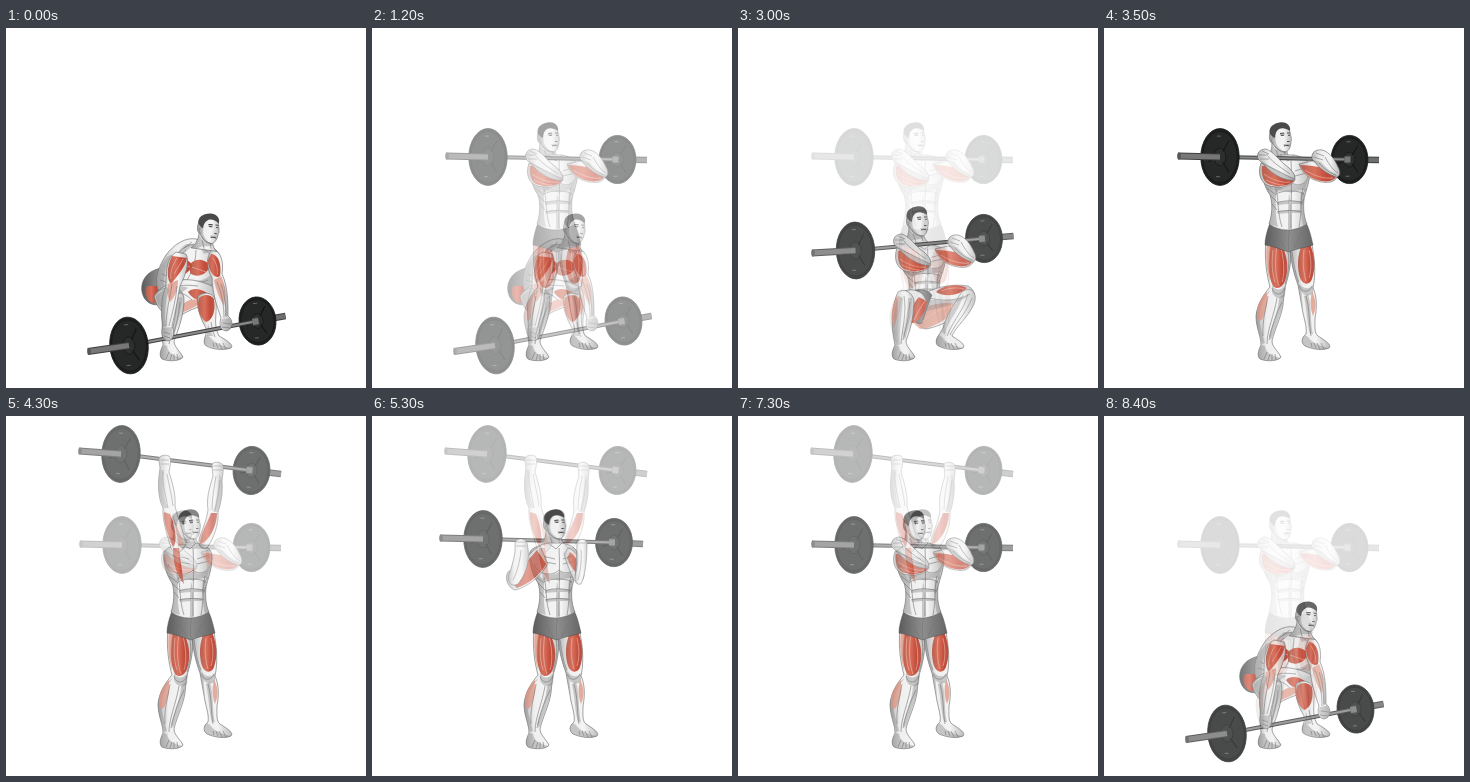
An HTML page that plays this animation: 360x360 px, repeating every 8500 ms.

```html
<!DOCTYPE html>
<html lang="en">
<head>
<meta charset="utf-8">
<style>
html, body { margin: 0; width: 100%; height: 100%; overflow: hidden; background: #fff }
svg { display: block; width: 100vw; height: 100vh }
.skin { fill: url(#skin); stroke: #666; stroke-width: .6 }
.red { fill: url(#red) }
.pale { fill: #dd9482; opacity: .75 }
.shade { fill: #7d7d7d; opacity: .38 }
.line { fill: none; stroke: #757575; stroke-width: .6 }
.fiber { fill: none; stroke: #efc0b2; stroke-width: .6 }
.dark { fill: none; stroke: #3c3c3c; stroke-width: .9 }
.hair { fill: #4a4a4a }
.shorts { fill: url(#shorts); stroke: #4a4a4a; stroke-width: .5 }
</style>
</head>
<body>
<svg viewBox="0 0 360 360">
  <defs>
    <linearGradient id="skin">
      <stop offset="0" stop-color="#b4b4b4"/><stop offset=".3" stop-color="#efefef"/>
      <stop offset=".65" stop-color="#f4f4f4"/><stop offset="1" stop-color="#bdbdbd"/>
    </linearGradient>
    <linearGradient id="red">
      <stop offset="0" stop-color="#b9604f"/><stop offset=".4" stop-color="#d8705c"/>
      <stop offset=".75" stop-color="#c24a38"/><stop offset="1" stop-color="#b9584a"/>
    </linearGradient>
    <linearGradient id="shorts">
      <stop offset="0" stop-color="#5c5c5c"/><stop offset=".5" stop-color="#8e8e8e"/><stop offset="1" stop-color="#666"/>
    </linearGradient>
  </defs>
</svg>
<script>
const svg = document.querySelector('svg');
const path = (cls, ...ds) => ds.map(d => `<path class="${cls}" d="${d}"/>`).join('');
const move = (x, y, body, extra = '') => `<g transform="translate(${x} ${y}) ${extra}">${body}</g>`;
const rod = (a, b, w, color) =>
  `<path d="M${a}L${b}" stroke="#3f3f3f" stroke-width="${w}"/><path d="M${a}L${b}" stroke="${color}" stroke-width="${w - 2}"/>`;

function plate([x, y], rx, ry, tilt) {
  const ring = (k, fill, stroke) => `<ellipse rx="${rx * k}" ry="${ry * k}" fill="${fill}" stroke="${stroke}" stroke-width=".8"/>`;
  const spoke = (u, v) => `M${rx * u * .25} ${ry * v * .25}L${rx * u * .75} ${ry * v * .75}`;
  return move(x, y, ring(.98, '#1e1f1f', '#161717') + ring(.88, '#262828', '#191a1a') + ring(.3, '#2d2f2f', '#171818') +
    `<path d="${spoke(.6, .7)}${spoke(.6, -.75)}${spoke(-.8, .2)}" stroke="#111" stroke-width="1"/>` +
    `<path d="M-3 ${-ry * .72}h4M-4 ${ry * .68}h4" stroke="#666" stroke-width="1"/>`, `rotate(${tilt})`);
}

// Barbell: left tip, left plate, right plate, right tip
const bar = (tipL, l, r, tipR, tilt) =>
  rod(r, tipR, 6.4, '#6f6f6f') + plate(r, 18.8, 24.6, tilt) + rod(l, r, 4.2, '#8b8b8b') +
  rod([r[0] - 5, r[1] - (r[1] - l[1]) * .04], [r[0] + 1, r[1]], 8, '#777') +
  plate(l, 19.6, 29, tilt) + rod(tipL, l, 7, '#777') +
  `<ellipse cx="${tipL[0] + 1}" cy="${tipL[1]}" rx="1.8" ry="3.6" fill="#555"/>`;

const head = (x, y, turn = 0) => move(x, y,
  path('skin', 'M-8 4C-8 12-9 17-14 22L12 22C8 19 7 16 6 12Z',
    'M-10-4C-10-13 8-16 10-5C11 0 12 2 11 4C11 9 9 14 6 15C1 16-4 12-7 7C-11 5-11 0-10-4Z') +
  path('shade', 'M-10-5C-9-9-6-10-2-9C-5-5-5 1-4 6C-2 11 2 14 6 15C1 16-4 12-7 7C-11 4-11 0-10-5Z',
    'M-8 8C-4 13 1 16 6 15L7 17C2 19-3 17-8 22H-13C-9 17-8 13-8 8Z', 'M0-4L5-4L4-1L0-1Z', 'M3 7L10 7L9 9L4 9Z') +
  path('hair', 'M-10-3C-12-9-7-14 1-14.7C8-15 11-10 10-6C6-9 2-9.5-1-8C-4-6-5-3-5 1L-7 0Z') +
  path('line', 'M-7 1C-10 1-8 7-6 6M-5 9C-3 13 2 15 6 15M-4 13L-1 21M4 14L6 20') +
  path('dark', 'M0-3.5L4-4M7-4L10-4M1-1.7H4M8-1.7H10M7 4.5H9.5M4 9C6 8.3 8 8.3 9.5 9'), `rotate(${turn})`);

const torso =
  path('skin', 'M158 136C160 131 170 129 176 127L190 127C200 129 207 133 206 143C206 153 202 162 200 171C199 181 200 190 203 196C190 204 176 204 165 196C168 187 169 176 166 167C161 160 156 146 158 136Z') +
  path('shade', 'M158 138C162 152 166 160 172 164C172 176 171 188 174 199L165 196C168 187 169 176 166 167C161 160 156 146 158 136Z',
    'M170 156C178 161 185 158 188 155C193 160 200 157 204 151L201 162C194 162 190 163 187 165C181 162 175 163 171 165Z',
    'M185 165C188 176 187 190 188 201L184 201C184 188 184 176 185 165Z', 'M197 164C195 176 197 188 199 198L203 196C200 188 198 178 201 166Z',
    'M173 174L185 173L185 176L173 177Z', 'M174 183L185 182L185 185L174 186Z', 'M188 173L197 173L197 176L188 176Z', 'M188 182L196 182L196 185L188 185Z') +
  path('line', 'M187 132C188 150 187 176 187 200M162 148C166 159 180 161 187 154C194 160 203 156 205 146M172 166C178 162 195 162 200 166M173 175C180 172 192 172 199 175M173 184C180 182 192 182 198 184M172 161C175 172 173 184 178 199M199 160C196 174 198 184 195 199',
    'M163 160L172 167M166 167L173 174M168 176L173 182M202 161L198 167M200 171L197 177M166 139L183 143M168 145L184 148M191 143L203 139M191 148L203 145M176 127L184 133L190 127');

const footL = 'C154 323 153 328 156 331C163 334 175 333 177 329C174 323 168 319 168 313';
const footR = 'C197 310 197 315 201 318C208 321 218 323 225 320C228 317 222 313 214 308';
const feet =
  path('shade', 'M158 317C154 323 153 328 156 331C163 334 172 333 177 330C170 329 162 326 161 318Z',
    'M201 307C197 310 197 315 201 318C208 321 218 323 225 320C216 318 208 315 204 309Z') +
  path('line', 'M160 331L163 324M164 332L166 326M168 332L168 326M172 332L171 326M208 319L207 315M212 320L210 315M216 321L213 315M220 321L217 315');

const legs =
  path('skin', `M162 212C160 232 163 248 166 259C160 266 153 276 152 288C152 300 157 308 157 317${footL}C170 303 177 290 179 277C180 268 180 262 182 256C186 243 188 230 186 216Z`,
    `M186 216C186 232 190 246 194 257C196 266 197 276 199 285C201 294 203 300 202 306${footR}C210 305 211 298 211 290C213 280 213 268 209 260C212 246 211 230 207 212Z`) +
  path('shade', 'M167 262C158 272 154 284 156 296L161 315L158 316C157 308 152 300 152 288C153 276 160 266 167 262Z',
    'M180 266C179 282 172 298 167 312L165 308C168 296 174 284 175 270Z', 'M168 257C171 263 178 263 182 257L181 268C176 272 170 270 168 264Z',
    'M188 222C188 236 192 248 197 259L199 282C197 270 195 262 194 257C190 246 186 232 187 220Z',
    'M204 266C208 280 206 296 209 306L206 306C203 296 203 282 200 268Z', 'M196 256C200 262 206 261 209 257L209 266C204 269 199 267 197 263Z') +
  path('red', 'M167 213C163 232 164 248 169 258C173 262 178 260 181 253C185 240 184 228 176 214Z',
    'M197 219C192 232 194 246 197 252C200 257 206 257 208 251C212 240 211 228 206 216Z') +
  path('pale', 'M163 264C154 272 151 283 154 292C159 296 161 284 163 276Z', 'M208 264C213 272 212 281 209 288C206 280 206 272 208 264Z',
    'M163 214C161 230 163 244 166 254C165 240 165 226 168 213Z') +
  path('fiber', 'M173 218C170 236 172 250 175 258M177 220C181 236 180 248 178 254M169 222C167 238 169 248 171 254M200 222C198 236 200 246 202 253M205 222C208 234 207 244 205 250') +
  path('line', 'M168 260C170 268 178 268 181 260M173 270C170 288 163 302 163 316M178 274C172 286 168 298 165 312M164 268C162 282 158 292 159 308M195 258C198 265 205 265 208 258M202 268C206 282 205 298 207 308M188 224C190 236 191 246 195 254M184 224C186 234 184 246 181 256') +
  feet + path('shorts', 'M166 195C163 203 161 210 161 217C169 218 178 222 185 224C193 220 202 220 209 217C207 208 205 200 202 195C190 201 178 201 166 195Z') +
  path('line', 'M186 200C184 208 184 216 185 224M166 200C172 206 178 214 181 221M202 199C198 206 193 212 190 220');

const rackArms =
  path('skin', 'M157 135C153 146 157 156 166 158C176 161 188 158 191 152C191 144 184 140 176 134Z', 'M195 136C199 149 214 156 227 154C235 151 236 144 230 138L208 133Z') +
  path('red', 'M158 138C157 148 160 156 167 157C176 160 186 157 190 153C186 143 172 136 158 138Z', 'M196 137C201 149 214 155 226 153C233 151 234 146 229 141C218 140 208 137 196 137Z') +
  path('fiber', 'M160 146C168 152 178 155 186 154M162 152C170 156 176 157 180 157M201 142C210 148 220 151 229 150') +
  path('skin', 'M154 131C152 125 156 121 162 121C170 124 174 131 180 136C187 141 193 147 190 152C182 154 168 146 162 139Z',
    'M208 131C207 125 211 121 218 122C226 124 231 132 234 139C237 144 236 149 232 149C224 146 220 143 215 139Z') +
  path('shade', 'M156 132C166 138 178 147 190 150C188 155 176 152 162 139Z', 'M209 132L217 134C222 140 228 145 234 147L231 149C224 146 218 142 214 138Z',
    'M165 158C168 163 173 164 180 160L174 158Z') +
  path('line', 'M158 135C168 140 180 146 190 151M164 128C170 136 178 140 186 146M155 127H164M156 131H165M158 123L165 126M212 125L220 128M210 129L219 132M221 129C226 138 229 142 234 145M215 135C220 141 226 145 232 147');

const overheadArms =
  path('skin', 'M153 45C152 40 157 38 163 40C166 44 164 50 163 56C166 66 170 78 169 90C172 102 176 112 180 128C174 140 168 138 165 132C161 118 156 104 157 92C151 80 152 64 154 52Z',
    'M206 50C206 45 214 45 217 49C218 55 216 60 216 66C217 76 215 88 212 96C213 108 208 122 201 132C194 134 191 128 194 120C198 110 201 102 202 94C200 82 204 70 207 60Z') +
  path('shade', 'M154 54C152 66 152 80 158 92L162 92C157 80 156 66 158 54Z', 'M213 58C212 72 211 84 207 96L212 96C215 86 217 74 216 62Z') +
  path('red', 'M158 96C157 106 162 120 167 131C172 126 169 110 164 98Z', 'M205 97C201 108 194 118 194 128C203 126 211 110 211 97Z',
    'M167 132C167 148 171 160 178 168C176 155 174 140 173 132Z') +
  path('pale', 'M166 97C170 108 174 118 178 128L172 131C172 118 168 106 166 97Z', 'M201 133C206 139 204 148 201 154C201 146 199 140 201 133Z') +
  path('line', 'M155 44H163M155 48H163M207 50H216M207 54H216M157 56C156 68 160 80 162 92M161 58C163 70 166 80 167 90M210 60C208 72 206 84 206 94M214 64C213 76 211 86 209 95');

const backArms =
  path('skin', 'M168 130C160 134 150 148 136 156C132 162 136 172 143 174C153 172 168 162 176 148Z', 'M196 132C204 134 211 146 212 160C210 168 205 170 202 164C198 156 194 146 192 138Z') +
  path('red', 'M165 134C158 142 150 152 142 157C140 164 142 170 145 172C156 168 168 160 174 148Z', 'M198 136C205 142 210 150 210 160C203 158 198 150 195 142Z') +
  path('skin', 'M143 128C143 122 153 121 155 127C158 140 157 154 146 168C138 172 134 164 138 156C141 146 144 136 143 128Z',
    'M205 128C206 122 214 122 215 127C215 140 214 158 209 168C203 170 202 162 204 154Z') +
  path('line', 'M144 126H154M144 130H154M149 134C148 146 145 156 141 164M206 127H214M209 134C210 146 208 156 206 164');

const squatLegs =
  path('skin', 'M182 268C194 260 214 255 230 258C238 262 238 270 234 278C222 286 206 298 188 301C176 300 176 280 182 268Z') +
  path('red', 'M198 264C206 256 222 256 229 260C222 267 208 270 198 264Z') +
  path('pale', 'M172 292C184 276 206 272 222 277C212 290 196 300 182 301Z') +
  path('skin', `M224 264C234 257 240 266 236 276C230 290 218 298 214 308C222 313 228 317 225 320C216 323 204 321 199 317C196 312 202 306 205 300C208 288 216 276 224 264Z`) +
  path('shorts', 'M176 264C182 260 190 262 194 267C190 276 187 286 184 295C180 297 176 294 173 288Z') +
  path('skin', 'M190 276C184 288 176 296 168 292C160 282 158 270 164 264C172 260 182 262 186 268Z') +
  path('red', 'M190 274C186 288 178 297 171 295C171 286 174 276 181 269Z') +
  path('skin', `M160 264C154 276 152 296 157 317${footL}C174 298 176 284 176 272C174 264 166 260 160 264Z`) +
  path('pale', 'M159 268C153 280 152 292 156 300C160 292 160 280 159 268Z') +
  path('shade', 'M165 270C164 286 161 302 162 317L158 317C154 300 155 284 160 268Z', 'M174 270C174 286 170 300 167 312L165 306C168 294 170 282 170 270Z',
    'M226 265C222 282 210 292 207 306L203 304C208 288 216 276 226 265Z', 'M190 271C204 274 220 272 230 268C220 276 200 280 186 284Z') +
  path('line', 'M166 268C169 284 164 302 163 316M172 274C171 288 168 300 165 312M230 266C226 282 214 294 209 308M234 270C229 284 217 296 212 307M192 270C206 274 222 272 232 266') +
  path('fiber', 'M203 263C210 260 220 259 226 261M184 294C194 284 206 280 216 279M176 292C180 284 184 277 187 273') + feet;

const lift =
  path('shorts', 'M156 240C142 242 134 252 136 264C138 274 146 279 157 276L168 262Z') +
  path('red', 'M141 258C138 266 141 273 147 275C153 274 155 266 153 258Z') +
  path('skin', 'M190 211C180 209 168 216 160 227C153 238 148 250 152 262C166 270 190 268 206 257C214 246 217 232 212 224C206 218 198 214 190 211Z') +
  path('shade', 'M162 228C153 238 149 250 152 262L160 266C156 252 158 240 168 226Z', 'M176 250C184 255 198 254 206 246L206 257C196 263 182 266 170 266Z',
    'M180 216C172 222 168 230 168 234L174 230C178 224 184 220 190 216Z', 'M190 212L208 222L198 226Z') +
  path('line', 'M188 216C176 218 168 228 164 240M190 222C190 236 184 250 174 262M180 222L166 234M156 246L166 250M154 252L166 256M174 252C182 256 194 256 202 252M192 216L204 226M186 214L178 220') +
  path('red', 'M184 236C190 229 200 231 204 238C200 248 190 250 184 245Z', 'M166 233C172 226 182 230 187 238C182 246 174 250 167 246Z') +
  path('fiber', 'M186 239L200 244M171 234L184 239M170 240L180 243') +
  path('skin', 'M148 268C160 252 180 246 206 258C212 264 210 274 204 278C192 277 180 284 170 290C160 290 150 280 148 268Z') +
  path('red', 'M182 264C188 258 199 262 204 268C200 275 188 274 182 264Z') +
  path('pale', 'M170 288C174 276 182 270 192 272C198 276 186 280 178 284Z') +
  path('skin', `M192 268C200 262 208 266 210 274C211 288 207 296 213 308C222 313 228 317 225 320C216 323 204 321 199 317C196 312 202 306 200 300C194 290 190 278 192 268Z`) +
  path('red', 'M193 270C190 280 194 290 200 294C207 292 210 282 208 271C204 266 198 266 193 270Z') +
  path('skin', `M164 262C156 276 155 298 157 317${footL}C174 298 178 284 178 272C178 262 170 258 164 262Z`) +
  path('pale', 'M160 270C155 280 154 290 157 298C162 292 162 280 160 270Z') +
  path('shade', 'M176 270C175 286 170 300 167 312L165 306C169 292 171 280 171 268Z', 'M202 296L207 308L201 308Z',
    'M150 268C160 258 172 256 182 260C172 266 164 276 160 284C154 280 150 274 150 268Z') +
  path('line', 'M170 266C172 284 166 302 163 316M174 274C173 288 169 300 166 312M205 294C206 300 207 304 209 309M150 264C160 258 176 256 192 258M156 272C164 262 176 262 186 272') + feet;

const liftArms =
  path('skin', 'M170 224C160 230 160 246 160 258C154 272 155 288 157 298C154 306 157 312 162 313C168 312 169 304 166 298C170 282 172 268 174 258C180 246 184 234 180 226Z',
    'M206 222C214 222 218 232 216 246C222 258 222 276 222 288C228 292 227 302 220 303C214 302 213 296 215 290C210 276 206 262 206 250C200 240 200 228 206 222Z') +
  path('red', 'M166 228C160 240 161 252 165 256C171 248 179 240 181 230Z', 'M205 226C212 226 216 236 214 248C208 252 202 242 202 232Z') +
  path('pale', 'M208 252L215 248C220 258 220 268 218 278C213 270 210 262 208 252Z', 'M162 256L172 252C172 262 168 270 164 274C161 268 161 262 162 256Z') +
  path('shade', 'M160 258C155 272 155 288 157 298L160 300C158 288 159 274 163 262Z', 'M217 254C222 264 222 278 222 288L219 288C219 276 219 266 217 254Z',
    'M157 300L166 299L167 310L162 313C157 311 155 306 157 300Z', 'M216 291L223 290C227 295 226 302 220 303C215 301 214 296 216 291Z') +
  path('fiber', 'M171 230C166 238 164 245 165 251M177 231L168 246M207 230C211 236 212 242 211 247') +
  path('line', 'M166 256C164 270 160 284 160 298M171 258C170 272 166 286 163 298M158 304L164 306M158 308L164 310M211 254C216 266 218 278 218 290M215 256C219 268 220 278 220 289M217 295L225 296M216 299L224 300');

const rackBar = bar([74, 128], [116, 129], [245.5, 131.5], [275, 132], 0);
const overheadBar = bar([73, 35], [115, 38], [245.5, 54.5], [275, 58], 3);
const poses = {
  lift: lift + bar([82, 323.5], [123, 317.5], [251.5, 293], [279.5, 288], -5) + liftArms + head(202, 200, 8),
  rack: legs + head(176, 109) + torso + rackBar + rackArms,
  squat: head(179, 193) + move(10, 115, torso, 'scale(.96 .8)') + squatLegs +
    bar([74, 225], [117.5, 222.5], [246, 210.5], [275.5, 208], -2) + move(2, 85, rackArms),
  press: overheadBar + legs + head(183, 108) + torso + overheadArms,
  back: bar([68, 122], [111, 123], [242, 126.5], [271, 128], 1) + legs + head(182, 108) + torso + backArms
};

const layers = {};
for (const name in poses) {
  const g = layers[name] = document.createElementNS(svg.namespaceURI, 'g');
  g.innerHTML = '<rect width="360" height="360" fill="#fff"/>' + poses[name];
}

// Each second a six-step cross-fade leads to the next pose
const order = ['lift', 'rack', 'squat', 'rack', 'press', 'back', 'press', 'rack', 'lift'];
const defs = svg.querySelector('defs');

function draw(now) {
  const t = now % 8500, n = Math.floor(t / 1000);
  const under = layers[order[Math.max(0, n - 1)]], over = layers[order[n]];
  under.setAttribute('opacity', 1);
  over.setAttribute('opacity', n ? Math.min(1, (Math.floor(t % 1000 / 100) + 1) / 6) : 1);
  svg.replaceChildren(defs, under, over);
}

const start = performance.now();
function tick() {
  draw(performance.now() - start);
  requestAnimationFrame(tick);
}
tick();
</script>
</body>
</html>
```
